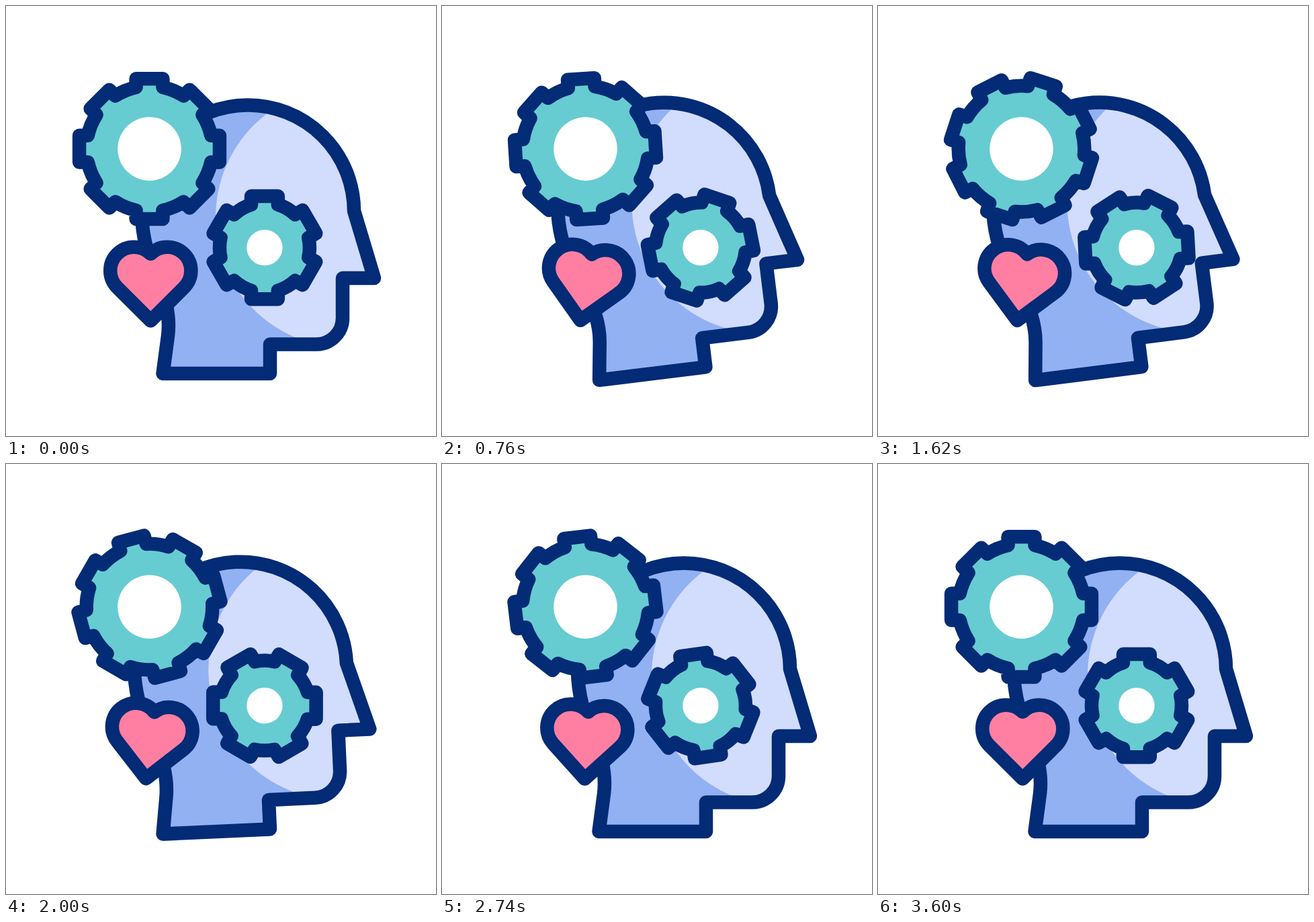
These frames come from a looping animation (640x640 px, 3.62 s). An HTML page:

```html
<!DOCTYPE html>
<html lang="en">
<head>
<meta charset="utf-8">
<title>Thinking head</title>
<style>
  html, body { margin: 0; height: 100%; overflow: hidden; background: #fff; }
  svg { display: block; width: 100vw; height: 100vh; }
  .line { stroke: #032b76; stroke-width: 20.5; stroke-linejoin: round; stroke-linecap: round; }
</style>
</head>
<body>
<svg viewBox="0 0 640 640">
  <defs>
    <path id="skull" d="M233.5 547H393V503.5H462A39 39 0 0 0 501 464.5V405H548L518 305
      A157.7 157.7 0 0 0 202 306C202 345 213 378 226 408C236 430 245 458 241 491Z"/>
    <clipPath id="inside"><use href="#skull"/></clipPath>
  </defs>
  <g id="head">
    <use href="#skull" fill="#92b1f3"/>
    <circle cx="506" cy="314.5" r="194" fill="#d2dcfd" clip-path="url(#inside)"/>
    <use href="#skull" class="line" fill="none"/>
  </g>
  <g id="bigGear"><path class="line" fill="#66ccd1"/><circle r="47.3" fill="#fff"/></g>
  <g id="smallGear"><path class="line" fill="#66ccd1"/><circle r="26.7" fill="#fff"/></g>
  <path id="heart" class="line" fill="#ff7fa2" d="M215.3 369A35.2 35.2 0 0 0 165.6 418.9
    L215.3 468.6L265 418.9A35.2 35.2 0 0 0 215.3 369Z"/>
</svg>
<script>
const LOOP = 3620;
const $ = id => document.getElementById(id);

// Closed gear outline around the origin, first tooth pointing up
function gearPath(teeth, bodyRadius, toothRadius, half = 19.9) {
  const base = Math.sqrt(bodyRadius ** 2 - half ** 2);
  let d = '';
  for (let i = 0; i < teeth; i++) {
    const a = i * 2 * Math.PI / teeth, c = Math.cos(a), s = Math.sin(a);
    const at = (x, y) => `${x * c + y * s} ${x * s - y * c}`;
    d += i ? `A${bodyRadius} ${bodyRadius} 0 0 1 ` : 'M';
    d += `${at(-half, base)}L${at(-half, toothRadius)}L${at(half, toothRadius)}L${at(half, base)}`;
  }
  return d + `A${bodyRadius} ${bodyRadius} 0 0 1 ${-half} ${-base}Z`;
}

// Smoothly eased value at time t through evenly spaced keys
function keyed(t, step, keys) {
  const i = Math.min(Math.floor(t / step), keys.length - 2);
  const p = Math.min(t / step - i, 1);
  return keys[i] + (keys[i + 1] - keys[i]) * p * p * (3 - 2 * p);
}

const turn = (id, value) => $(id).setAttribute('transform', value);

function draw(now) {
  const t = now % LOOP;
  const spin = keyed(t, 3600, [0, 360]);
  turn('head', `rotate(${keyed(t, 1200, [0, -10, 0, 0])} 314 547)`);
  turn('bigGear', `translate(213.5 212.6) rotate(${spin})`);
  turn('smallGear', `translate(384.9 359.6) rotate(${-spin})`);
  turn('heart', `rotate(${keyed(t, 600, [0, 15, -15, 15, -15, 15, 0])} 215.3 413.7)`);
}

$('bigGear').firstChild.setAttribute('d', gearPath(8, 93.8, 104.4));
$('smallGear').firstChild.setAttribute('d', gearPath(6, 67, 76.7));

let start;
function tick(now) {
  start ??= now;
  draw(now - start);
  requestAnimationFrame(tick);
}
draw(0);
requestAnimationFrame(tick);
</script>
</body>
</html>
```
